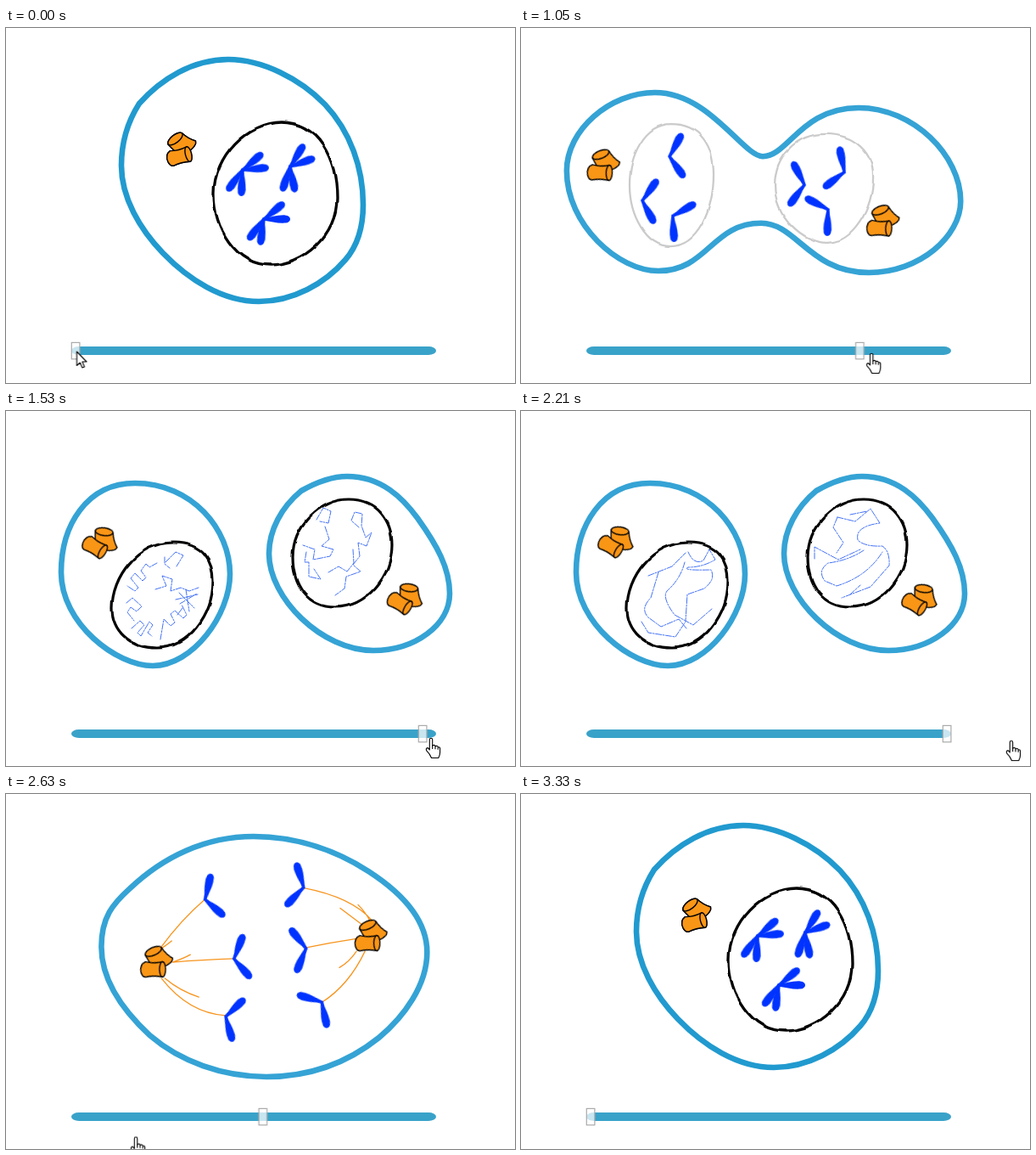
Write an HTML page without scripts that moves like this. It is 600x418 px and loops after 4.03 s.

```html
<!DOCTYPE html>
<html lang="en">
<head>
<meta charset="utf-8">
<title>Cell division slider</title>
<style>
html, body { margin: 0; width: 100%; height: 100%; overflow: hidden; background: #fff; }
svg { display: block; width: 600px; height: 418px; }

/* Shared poses: a resting, b prophase, c metaphase, d anaphase, e telophase, f pinched, g split, h end.
   The slider runs forward and then back, so each pose has two times. */
@keyframes pose {
  0%, 10.42%, 69.73%, 100% { transform: var(--a); }
  17.87%, 67.6% { transform: var(--b); }
  19.8%, 66.35% { transform: var(--c); }
  21.49%, 65.26% { transform: var(--d); }
  26.05%, 62.41% { transform: var(--e); }
  31.51%, 60.94% { transform: var(--f, var(--e)); }
  37.97%, 59.63% { transform: var(--g, var(--e)); }
  41.94%, 59.31% { transform: var(--h, var(--g, var(--e))); }
}
@keyframes outline {
  0%, 10.42%, 69.73%, 100% { d: var(--a); stroke: #219acf; }
  17.87%, 67.6% { d: var(--b); stroke: #229bd0; }
  21.49%, 65.26% { d: var(--d); stroke: #35a3d5; }
  26.05%, 62.41% { d: var(--e); stroke: #35a3d5; }
  31.5%, 60.95% { d: var(--f); stroke: #35a3d5; }
}
@keyframes whole {
  0%, 31.5%, 60.95%, 100% { opacity: 1; }
  31.51%, 60.94% { opacity: 0; }
}
@keyframes part {
  0%, 31.5%, 60.95%, 100% { d: var(--f); opacity: 0; }
  31.51%, 60.94% { d: var(--f); opacity: 1; }
  37.97%, 59.63% { d: var(--g); opacity: 1; }
}
@keyframes spindle {
  0%, 16%, 23.6%, 64%, 68.2%, 100% { opacity: 0; }
  17.87%, 21.49%, 65.26%, 67.6% { opacity: 1; }
  17.87%, 67.6% { d: var(--b); }
  19.8%, 66.35% { d: var(--c); }
  21.49%, 65.26% { d: var(--d); }
}
@keyframes dissolve {
  0%, 10.42%, 69.73%, 100% { opacity: 1; stroke: #000; }
  13%, 69% { opacity: 1; stroke: #ccc; }
  15%, 68.4% { opacity: 0; stroke: #ccc; }
}
@keyframes reform {
  0%, 23.5%, 63.5%, 100% { d: var(--e); opacity: 0; stroke: #ccc; stroke-width: 2.3px; }
  25.4%, 26.05%, 62.41%, 62.7% { d: var(--e); opacity: 1; stroke: #ccc; stroke-width: 2.3px; }
  37.97%, 59.63% { d: var(--g); opacity: 1; stroke: #000; stroke-width: 3.2px; }
}
@keyframes condensed {
  0%, 32%, 60.8%, 100% { opacity: 1; }
  34.5%, 60.2% { opacity: 0; }
}
@keyframes drift {
  0%, 26.05%, 62.41%, 100% { transform: none; }
  37.97%, 59.63% { transform: var(--to); }
}
@keyframes coiled {
  0%, 33%, 39.7%, 59.7%, 60.7%, 100% { opacity: 0; }
  34.5%, 39.69%, 59.71%, 60.2% { opacity: 1; }
}
@keyframes loose {
  0%, 39.69%, 59.7%, 100% { opacity: 0; }
  39.7%, 59.69% { opacity: 1; }
}
@keyframes hand {
  0%, 10.41% { opacity: 0; transform: translate(90px, 384px); }
  10.42% { opacity: 1; transform: translate(90px, 384px); }
  17.87% { transform: translate(265px, 382px); }
  23.08% { transform: translate(388px, 383px); }
  26.05% { transform: translate(413px, 383px); }
  37.22%, 45.9% { transform: translate(501px, 385px); }
  54.84% { transform: translate(578px, 388px); }
  57% { transform: translate(572px, 396px); }
  58.56% { transform: translate(510px, 392px); }
  59.31% { transform: translate(480px, 393px); }
  65.26% { transform: translate(155px, 403.5px); }
  67.6% { opacity: 1; transform: translate(-20px, 414px); }
  67.61%, 100% { opacity: 0; transform: translate(-20px, 414px); }
}
@keyframes arrow {
  0% { opacity: 1; transform: translate(83.5px, 381px); }
  3.97% { opacity: 0; transform: translate(83.5px, 381px); }
  80.4% { opacity: 1; transform: translate(474px, 399px); }
  81.14% { opacity: 1; transform: translate(300px, 395px); }
  81.89% { opacity: 1; transform: translate(93px, 383px); }
  82.63%, 100% { opacity: 0; transform: translate(93px, 383px); }
}
svg * { animation: 4.03s linear infinite; }
.line { fill: none; stroke-linecap: round; stroke-linejoin: round; }
.cell { stroke: #35a3d5; stroke-width: 6.6px; }
.whole { animation-name: outline, whole; }
.half { animation-name: part; }
.nucleus { stroke-width: 3.3px; filter: url(#wobble); }
.first { animation-name: dissolve; }
.new { animation-name: reform; }
.spindle { stroke: #f7941d; stroke-width: 1.3px; animation-name: spindle; }
.pair, .v, .arm, .knob { animation-name: pose; }
.pair { fill: #fa9616; stroke: #000; stroke-width: 1.4px; stroke-linejoin: round; }
.set { fill: #0033ff; animation-name: condensed; }
.drift { animation-name: drift; }
.strands { stroke: #4472f5; stroke-width: 1px; stroke-dasharray: 7 1.5 2 1.5; }
.coiled { animation-name: coiled; }
.loose { animation-name: loose; }
.in .up { --a: rotate(-49deg); --b: rotate(-49deg); --c: rotate(-54deg); --d: rotate(-59deg); --e: rotate(-58deg); }
.in .down { --a: rotate(49deg); --b: rotate(49deg); --c: rotate(54deg); --d: rotate(59deg); --e: rotate(58deg); }
.out .up { --a: rotate(97deg); --b: rotate(94deg); --c: rotate(80deg); --d: rotate(59deg); --e: rotate(58deg); }
.out .down { --a: rotate(-97deg); --b: rotate(-94deg); --c: rotate(-80deg); --d: rotate(-59deg); --e: rotate(-58deg); }
.knob {
  fill: #fff; fill-opacity: .72; stroke: #aaa; stroke-width: 1.2px;
  --a: translateX(0px); --b: translateX(106px); --c: translateX(168px); --d: translateX(222px);
  --e: translateX(317px); --f: translateX(366px); --g: translateX(409px); --h: translateX(420px);
}
.cursor { fill: #fff; stroke: #000; stroke-width: 1.1px; stroke-linejoin: round; }
.hand { animation-name: hand; }
.arrow { animation-name: arrow; animation-timing-function: step-end; }
</style>
</head>
<body>
<svg viewBox="0 0 600 418">
  <defs>
    <path id="arm" d="M-1-1.4C8-1.6 15-5 25-4.6C33-4 33 4 25 4.6C16 5.2 8 2.4 -1 1.4Z"/>
    <g id="barrels">
      <path d="M.8-20Q7-14 16.5-11Q18-6 9 1H-8L-16-7Z"/>
      <ellipse rx="10.3" ry="4.6" transform="translate(-7.5 -13.5) rotate(-38)"/>
      <g transform="translate(8 4.5) rotate(-14)">
        <path d="M0-9Q-11-6.5-20-9Q-27-6-25.5 3Q-24 9-20 9Q-11 7 0 9Z"/>
        <ellipse rx="3.6" ry="9"/>
      </g>
    </g>
    <filter id="wobble" color-interpolation-filters="sRGB">
      <feTurbulence type="fractalNoise" baseFrequency=".05" numOctaves="1" seed="4"/>
      <feDisplacementMap in="SourceGraphic" scale="5" xChannelSelector="R" yChannelSelector="G"/>
    </filter>
  </defs>

  <path class="line cell whole" style="
    --a:path('M136,162C136,135 143,111 157,89C183,60 220,37 262,37C302,37 347,60 376,90C406,122 421,165 421,208C421,236 413,258 400,273C376,301 338,322 298,322C255,322 215,296 185,265C158,237 136,200 136,162Z');
    --b:path('M152,178C152,148 162,122 177,98C203,68 238,49 277,49C318,49 362,72 390,105C418,137 435,168 435,204C435,230 422,256 405,275C385,296 345,329 304,329C260,329 222,302 194,272C170,245 152,214 152,178Z');
    --d:path('M112,180C112,145 126,129 145,112C185,74 235,50 292,50C345,50 392,68 428,91C470,118 497,150 497,186C497,225 470,262 440,287C405,315 360,333 307,333C255,333 205,315 170,285C132,250 112,215 112,180Z');
    --e:path('M54,168C54,120 105,76 158,76C222,76 262,151 285,151C315,151 330,94 398,94C462,94 518,150 518,204C518,245 470,288 410,288C340,288 325,230 283,230C225,230 220,286 162,286C115,286 54,232 54,168Z');
    --f:path('M27,170C27,120 80,72 140,72C220,72 250,186 287,187C325,186 335,84 420,84C510,84 562,150 562,204C562,250 510,292 440,292C360,292 325,196 287,195C250,196 220,296 150,296C80,296 27,232 27,170Z')"/>
  <path class="line cell half" style="
    --f:path('M27,180C27,125 75,72 140,72C215,72 283,150 283,190C283,235 215,297 150,297C80,297 27,240 27,180Z');
    --g:path('M65,190C65,135 95,85 152,85C220,85 264,140 264,192C264,240 220,300 173,300C130,300 65,250 65,190Z')"/>
  <path class="line cell half" style="
    --f:path('M292,188C292,160 330,110 360,94C380,85 405,82 425,82C470,82 500,105 525,132C550,160 562,185 562,212C562,255 510,290 445,290C370,290 292,230 292,188Z');
    --g:path('M310,168C310,140 325,113 348,94C364,85 383,77 402,77C443,77 468,103 485,126C508,158 523,185 523,215C523,252 482,282 433,282C372,282 310,220 310,168Z')"/>

  <path class="line nucleus first" d="M245,195C245,150 285,111 324,111C369,111 390,155 390,200C390,245 350,279 312,279C270,279 245,235 245,195Z"/>
  <path class="line nucleus new" style="
    --e:path('M128,185C128,150 145,113 177,113C212,113 227,140 227,172C227,215 208,257 176,257C147,257 128,220 128,185Z');
    --g:path('M125,232C125,195 155,155 197,155C235,155 244,180 244,200C244,240 215,279 178,279C145,279 125,258 125,232Z')"/>
  <path class="line nucleus new" style="
    --e:path('M299,185C299,150 325,125 358,125C395,125 415,148 415,175C415,215 390,253 362,253C332,253 299,222 299,185Z');
    --g:path('M338,172C338,135 370,104 404,104C438,104 455,130 455,157C455,195 425,231 388,231C355,231 338,205 338,172Z')"/>

  <g class="line strands coiled">
    <path d="M178 179l-9 5-4-4-6 8 6 8-4 4-9-9-5 6 9 11-4 4-9-6M142 226l7-6 11 10-6 6-7-5-4 6 8 10"/>
    <path d="M188 178l12-12 9 4-8 13M187 172v8l6 5M176 210l13-4-5-12 12 4-2 14 12-4 10 4 11-4M200 222l26-6M205 227l20-12M204 214l18 18M212 210l4 26M208 232l-6 8"/>
    <path d="M148 256l10-9 5 5-8 9 4 4 10-17 4 4-6 9 5 4M182 269l4-24 8 8 5-4-5-10 5-4 10 9 4-4-6-12"/>
    <path d="M366 128l8-14 9 4-3 14-10-2M376 136l5 15-9 8 14 4-4 8-20 4 2-12-14-5M354 166l-2 12 5 0 0 17 14 3-8-12"/>
    <path d="M416 137l-9-8 4-10 9 2-1 14 5 14 7-6-6 16-10-4 2 16-8 10 9 8-17 6-2 14-11 8M380 190l12-7 10 6 8-10-1-16"/>
  </g>
  <g class="line strands loose">
    <path d="M150 194L178 183L194 167M162 190L153 220Q140 233 150 243L165 254L186 245L195 256M142 248L150 261L182 266L194 248"/>
    <path d="M193 178Q188 198 172 212Q166 220 181 240L203 252L225 233M197 166Q204 182 215 176L222 163L229 175Q214 184 197 184Q188 188 224 187Q230 198 216 209L196 216L194 247"/>
    <path d="M346 174V160L374 175L400 163M373 125L368 137L380 155L372 167M373 125L394 130L412 115L423 132Q393 136 397 152Q405 160 426 159Q435 165 434 182L412 207L378 220"/>
    <path d="M404 164Q386 176 362 179Q349 188 358 200L372 206Q408 195 426 166M388 122L408 118M388 216L400 205"/>
  </g>

  <path class="line spindle" style="
    --b:path('M205,202Q207,188 214,181M232,228Q242,218 247,208M221,237Q235,256 267,254M216,203Q223,197 230,191M230,233Q233,234 236,235M221,237Q235,256 267,254');
    --c:path('M192,188Q230,145 298,122M208,205Q250,195 298,187M196,222Q235,262 303,255M194,186Q201,177 207,171M208,205Q220,200 230,196M198,222Q215,238 240,246');
    --d:path('M182,181Q205,149 233,124M196,198Q230,195 268,194M183,217Q215,258 258,261M184,181Q190,177 195,173M196,198Q210,193 217,189M187,217Q205,232 227,239')"/>
  <path class="line spindle" style="
    --b:path('M300,81Q285,82 275,92M300,89Q292,92 286,99M318,117Q313,123 306,126M300,81Q285,82 275,92M300,89Q292,92 286,99M318,117Q313,123 306,126');
    --c:path('M385,122Q345,100 302,122M372,142Q340,160 302,187M383,158Q365,225 307,255M386,122Q380,112 372,104M376,126Q366,117 352,113M372,158Q362,170 352,178');
    --d:path('M433,150Q410,122 351,110M414,171Q385,175 354,181M424,186Q405,225 374,245M430,150Q425,140 416,131M420,154Q408,145 395,135M414,186Q405,199 394,205')"/>

  <g class="set">
    <g class="drift in" style="--to:translate(8px,32px)">
      <g class="v" style="--a:translate(279px,167px)rotate(44deg);--b:translate(267px,138px)rotate(5deg);--c:translate(299px,122px)rotate(0deg);--d:translate(233px,124px)rotate(-18deg);--e:translate(175px,151px)rotate(-3deg)"><use href="#arm" class="arm up"/><use href="#arm" class="arm down"/></g>
      <g class="v" style="--a:translate(335px,163px)rotate(30deg);--b:translate(319px,167px)rotate(10deg);--c:translate(299px,187px)rotate(0deg);--d:translate(268px,194px)rotate(-10deg);--e:translate(143px,203px)rotate(4deg)"><use href="#arm" class="arm up"/><use href="#arm" class="arm down"/></g>
      <g class="v" style="--a:translate(304px,225px)rotate(49deg);--b:translate(324px,254px)rotate(13deg);--c:translate(304px,255px)rotate(10deg);--d:translate(258px,262px)rotate(16deg);--e:translate(179px,221px)rotate(29deg)"><use href="#arm" class="arm up"/><use href="#arm" class="arm down"/></g>
    </g>
    <g class="drift out" style="--to:translate(39px,-21px)">
      <g class="v" style="--a:translate(279px,167px)rotate(223deg);--b:translate(267px,138px)rotate(182deg);--c:translate(301px,122px)rotate(183deg);--d:translate(352px,110px)rotate(194deg);--e:translate(381px,170px)rotate(201deg)"><use href="#arm" class="arm up"/><use href="#arm" class="arm down"/></g>
      <g class="v" style="--a:translate(335px,163px)rotate(205deg);--b:translate(319px,167px)rotate(189deg);--c:translate(301px,187px)rotate(181deg);--d:translate(355px,182px)rotate(172deg);--e:translate(334px,185px)rotate(185deg)"><use href="#arm" class="arm up"/><use href="#arm" class="arm down"/></g>
      <g class="v" style="--a:translate(304px,225px)rotate(224deg);--b:translate(324px,254px)rotate(190deg);--c:translate(306px,255px)rotate(170deg);--d:translate(374px,245px)rotate(137deg);--e:translate(362px,214px)rotate(150deg)"><use href="#arm" class="arm up"/><use href="#arm" class="arm down"/></g>
    </g>
  </g>

  <use href="#barrels" class="pair" style="--a:translate(207px,144px)rotate(0deg);--b:translate(217px,220px)rotate(0deg);--c:translate(192px,207px)rotate(6deg);--d:translate(177.5px,200px)rotate(14deg);--e:translate(97.5px,164px)rotate(16deg);--g:translate(111.5px,157px)rotate(45deg);--h:translate(112.5px,156px)rotate(45deg)"/>
  <use href="#barrels" class="pair" style="--a:translate(207px,144px)rotate(0deg);--b:translate(316.5px,97.5px)rotate(0deg);--c:translate(388px,140px)rotate(6deg);--d:translate(431.5px,170px)rotate(14deg);--e:translate(427px,229.5px)rotate(16deg);--g:translate(471px,223px)rotate(45deg);--h:translate(470.5px,224px)rotate(45deg)"/>

  <rect x="77" y="375" width="430" height="10" rx="9" ry="5" fill="#39a2c9"/>
  <rect class="knob" x="77.3" y="370.4" width="9.6" height="19.4"/>
  <g class="cursor hand">
    <path d="M-1.7 14V2a1.7 1.7 0 0 1 3.4 0V9Q4.6 7.6 5 9.6Q8 8.8 8.2 10.8Q10.6 10.2 10.6 12.6V17Q10.6 20 8.8 23.5H.5Q-1 19-5.3 14.8Q-6.5 12-4 11.6Q-2.7 12-1.7 14Z"/>
    <path d="M1.7 9v4M5 9.6v3.6M8.2 10.8v3"/>
  </g>
  <path class="cursor arrow" d="M0 0V16.5L3.8 13L6.4 19L9 18L6.5 12H11.5Z"/>
</svg>
</body>
</html>
```
